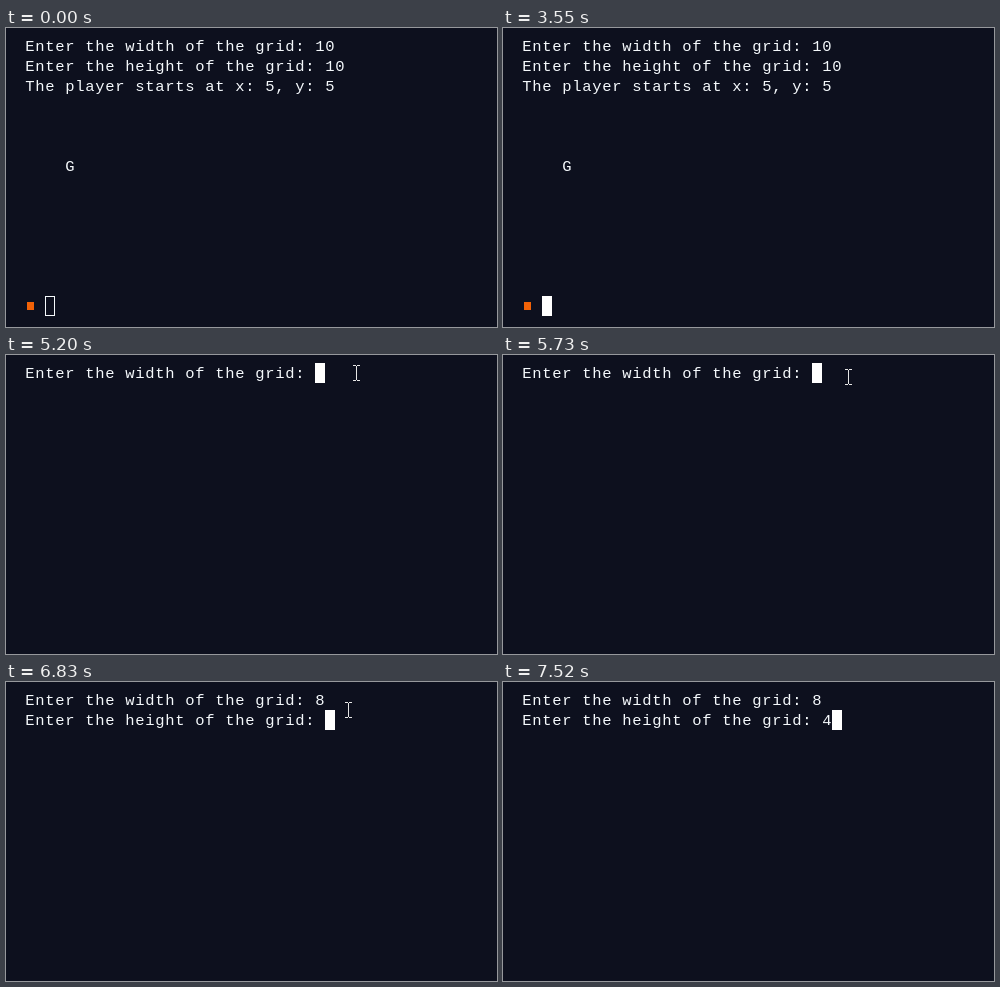
Write an HTML page with a canvas that moves like this. It is 491x299 px and loops after 8 s.

```html
<!DOCTYPE html>
<html lang="en">
<head>
<meta charset="utf-8">
<title>Grid terminal</title>
<style>
  html, body { margin: 0; width: 100%; height: 100%; overflow: hidden; background: #0d101e; }
  canvas { display: block; }
</style>
</head>
<body>
<canvas id="stage" width="491" height="299"></canvas>
<script>
const ctx = document.getElementById("stage").getContext("2d");
const LOOP = 8000, CELL = 10, ROW = 20, LEFT = 19, TOP = 8;
const WIDTH = "Enter the width of the grid: ";
const HEIGHT = "Enter the height of the grid: ";
const INK = "#f5f9fc";

// Each stroke moves by (dx, dy) every `step` ms, then rests after `count` moves
const strokes = [
  { at: 450, until: 600, step: 75, count: 1, x: 371, y: 254, dx: -79, dy: -28 },
  { at: 4880, until: 5270, step: 150, count: 2, x: 355, y: 0, dx: -4, dy: 5 },
  { at: 5270, until: 6830, step: 230, count: 4, x: 346, y: 12, dx: -2, dy: 1 },
  { at: 6830, until: 7210, step: 80, count: 1, x: 339, y: 20, dx: 1, dy: 2 },
  { at: 7210, until: 7520, step: 75, count: 3, x: 345, y: 26, dx: 39, dy: 28 }
];

// One character per cell, as a terminal does
function write(text, row, col = 0) {
  ctx.fillStyle = INK;
  [...text].forEach((c, i) =>
    ctx.fillText(c, LEFT + (col + i + 0.5) * CELL, TOP + row * ROW + 15));
}

function block(row, col, hollow) {
  const x = LEFT + col * CELL, y = TOP + row * ROW;
  ctx.fillStyle = "#fff";
  ctx.strokeStyle = INK;
  if (hollow) ctx.strokeRect(x + 0.5, y + 0.5, CELL - 1, ROW - 1);
  else ctx.fillRect(x, y, CELL, ROW);
}

function beam(x, y) {
  ctx.fillStyle = "#e6e6e6";
  ctx.fillRect(x + 3, y + 1, 1, 14);
  for (const edge of [y, y + 15]) {
    ctx.fillRect(x, edge, 3, 1);
    ctx.fillRect(x + 4, edge, 3, 1);
  }
}

function pointer(t) {
  const s = strokes.find(s => t >= s.at && t < s.until);
  if (!s) return;
  const moves = Math.min(s.count, Math.floor((t - s.at) / s.step));
  beam(s.x + s.dx * moves, s.y + s.dy * moves);
}

function finishedGame(t) {
  write(WIDTH + "10", 0);
  write(HEIGHT + "10", 1);
  write("The player starts at x: 5, y: 5", 2);
  write("G", 6, 4);
  ctx.fillStyle = "#f26207";
  ctx.fillRect(21, 274, 7, 8);
  block(13, 2, t < 3550);
}

function newGame(t) {
  const first = t < 6440 ? WIDTH : WIDTH + "8";
  write(first, 0);
  if (t < 6830) return block(0, first.length);
  const second = t < 7290 ? HEIGHT : HEIGHT + "4";
  write(second, 1);
  block(1, second.length);
}

function draw(now) {
  const t = now % LOOP;
  ctx.fillStyle = "#0d101e";
  ctx.fillRect(0, 0, 491, 299);
  ctx.font = "15.5px 'Courier New', 'Liberation Mono', monospace";
  ctx.textAlign = "center";
  (t < 4100 ? finishedGame : newGame)(t);
  pointer(t);
}

const start = performance.now();
function tick() {
  draw(performance.now() - start);
  requestAnimationFrame(tick);
}
tick();
</script>
</body>
</html>
```
